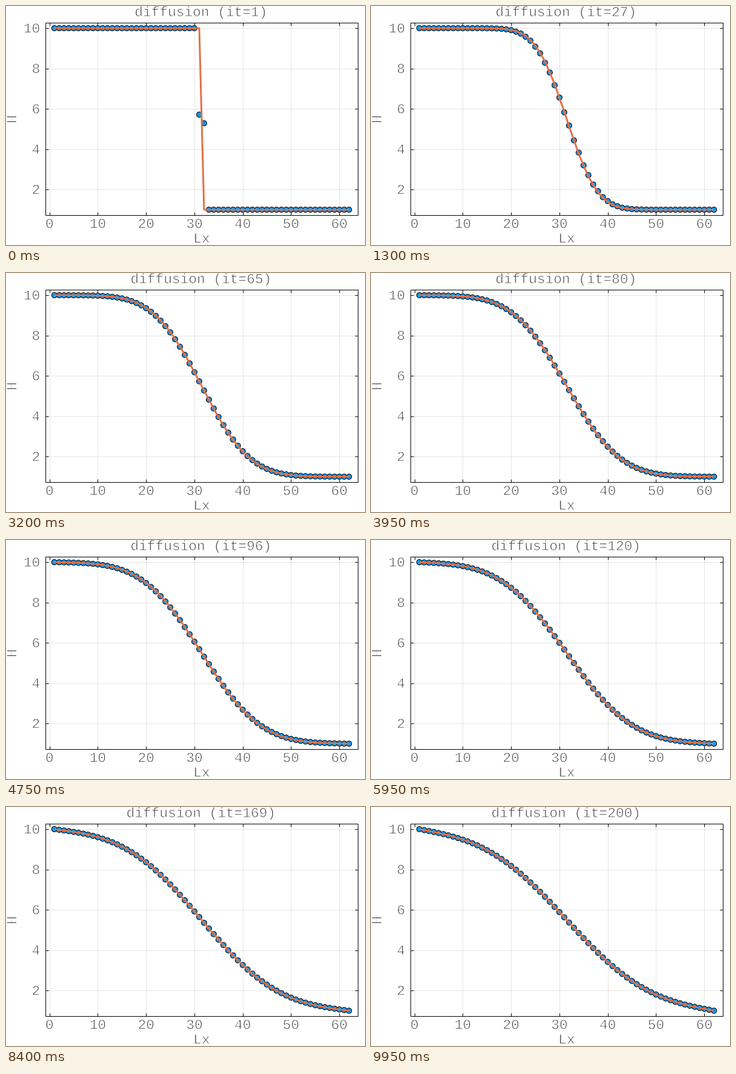
Recreate the animation shown at these times as a matplotlib script. Size 600x400 px, loop 10 s.

```python
import numpy as np
import matplotlib.pyplot as plt
from matplotlib.animation import FuncAnimation
from matplotlib.patheffects import Stroke

W, H, DPI = 600, 400, 100
PX = 72 / DPI                      # one pixel in points
LEFT, RIGHT, TOP, BOTTOM = 66, 588, 28, 350
XLIM, YLIM = (-0.83, 63.83), (0.73, 10.27)
STEPS = 200

x = np.arange(1, 63)


def diffuse(n_steps, ratio=1 / 2.1):
    """Explicit 1D diffusion of a step with fixed ends; row k holds k steps."""
    h = np.where(x <= 31, 10.0, 1.0)
    rows = [h]
    for _ in range(n_steps):
        h = h.copy()
        h[1:-1] += ratio * np.diff(h, 2)
        rows.append(h)
    return rows


states = diffuse(STEPS)

fig = plt.figure(figsize=(W / DPI, H / DPI), dpi=DPI, facecolor="white")
ax = fig.add_axes([LEFT / W, 1 - BOTTOM / H, (RIGHT - LEFT) / W, (BOTTOM - TOP) / H])
ax.set(xlim=XLIM, ylim=YLIM, xticks=range(0, 61, 10), yticks=range(2, 11, 2))
ax.set_axisbelow(True)
ax.grid(color="black", alpha=0.1, linewidth=PX)
ax.tick_params(direction="in", top=True, right=True, length=5 * PX, width=PX,
               labelbottom=False, labelleft=False)
for spine in ax.spines.values():
    spine.set_linewidth(PX)


def label(px, py, text, ha="center", rotation=0):
    """Thin monospaced text with its baseline at pixel (px, py) from the top left."""
    return fig.text(px / W, 1 - py / H, text, ha=ha, va="baseline",
                    rotation=rotation, rotation_mode="anchor",
                    family="Liberation Mono", fontsize=23.1 * PX, color="#404040",
                    path_effects=[Stroke(linewidth=0.8 * PX, foreground="white")])


def to_px(value, lim, start, end):
    return start + (value - lim[0]) / (lim[1] - lim[0]) * (end - start)


for v in range(0, 61, 10):
    label(to_px(v, XLIM, LEFT, RIGHT), 371.5, str(v))
for v in range(2, 11, 2):
    label(57, to_px(v, YLIM, BOTTOM, TOP) + 7.5, str(v), ha="right")
label(327, 396, "Lx")
label(16.5, 189, "H", rotation=90)
title = label(326, 17, "")

# One size per dot keeps their positions from being rounded to whole pixels.
dots = ax.scatter(x, states[0], s=np.full(x.size, (9 * PX) ** 2), c="#009AFA",
                  edgecolors="black", linewidths=PX, zorder=3)
line, = ax.plot(x, states[0], color="#E36F47", linewidth=3 * PX,
                solid_capstyle="butt", zorder=4)


def update(i):
    title.set_text(f"diffusion (it={i + 1})")
    dots.set_offsets(np.column_stack([x, states[i + 1]]))
    line.set_ydata(states[i])      # the line trails the dots by one step
    return title, dots, line


anim = FuncAnimation(fig, update, frames=STEPS, interval=50, repeat=True, repeat_delay=0)
plt.show()
```
